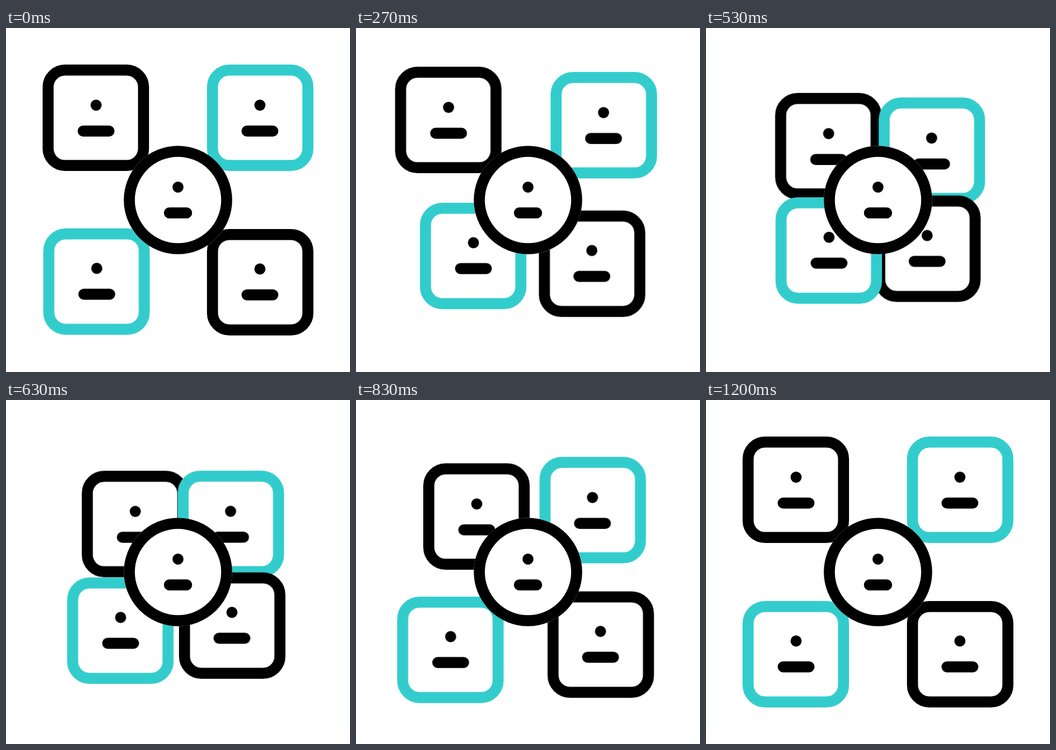
An HTML page without scripts that plays this animation: 640x640 px, repeating every 1.67 s.

```html
<!DOCTYPE html>
<html lang="en">
<head>
<meta charset="utf-8">
<title>Gathering tiles</title>
<style>
  html, body { margin: 0; height: 100%; overflow: hidden; background: #fff; }
  svg { display: block; width: 100%; height: 100%; }
  .outline, .bar { stroke: currentColor; stroke-width: 20.5; }
  .outline { fill: #fff; }
  .bar { stroke: #000; stroke-linecap: round; }
  .teal { color: #33cccc; }

  .tile { animation: gather 1670ms var(--delay, 0ms) infinite; }
  .top-left     { --x: 73.3px;  --y: 64px;    --delay: 203ms; }
  .top-right    { --x: -54.8px; --y: 63.7px;  --delay: 137ms; }
  .bottom-right { --x: -61.3px; --y: -62.7px; --delay: 33ms; }
  .bottom-left  { --x: 66.6px;  --y: -64.1px; animation-name: gather-early; }

  @keyframes gather {
    0% { transform: none; animation-timing-function: cubic-bezier(.333, 0, .667, 1); }
    26.75%, 28.54% { transform: translate(var(--x), var(--y)); animation-timing-function: cubic-bezier(.333, 0, .667, 1); }
    58.28%, 100% { transform: none; }
  }
  /* This tile is already on its way when the loop begins. */
  @keyframes gather-early {
    0% {
      transform: translate(calc(var(--x) * .019), calc(var(--y) * .019));
      animation-timing-function: cubic-bezier(.333, .141, .667, 1);
    }
    24.75%, 26.65% { transform: translate(var(--x), var(--y)); animation-timing-function: cubic-bezier(.333, 0, .667, 1); }
    56.39%, 100% { transform: translate(0, 0); }
  }
</style>
</head>
<body>
<svg viewBox="0 0 640 640">
  <defs>
    <rect id="frame" class="outline" x="10.25" y="10.25" width="177.5" height="177.5" rx="31.5"/>
    <g id="face">
      <circle r="10.3"/>
      <path class="bar" d="M-24 48.1H24"/>
    </g>
  </defs>

  <g class="tile top-left">
    <use href="#frame" x="68.1" y="68.1"/>
    <use href="#face" x="167.6" y="143.6"/>
  </g>
  <g class="tile top-right">
    <use href="#frame" class="teal" x="373.9" y="68.1"/>
    <use href="#face" x="472.4" y="143.6"/>
  </g>
  <g class="tile bottom-right">
    <use href="#frame" x="373.9" y="373.9"/>
    <use href="#face" x="472.4" y="448.4"/>
  </g>
  <g class="tile bottom-left">
    <use href="#frame" class="teal" x="68.1" y="373.9"/>
    <use href="#face" x="167.6" y="448.4"/>
  </g>

  <circle cx="320" cy="320" r="100.8" fill="#fff"/>
  <circle class="outline" cx="320" cy="320" r="90.55"/>
  <circle cx="320" cy="296" r="10.3"/>
  <path class="bar" d="M304 343.9H336"/>
</svg>
</body>
</html>
```
